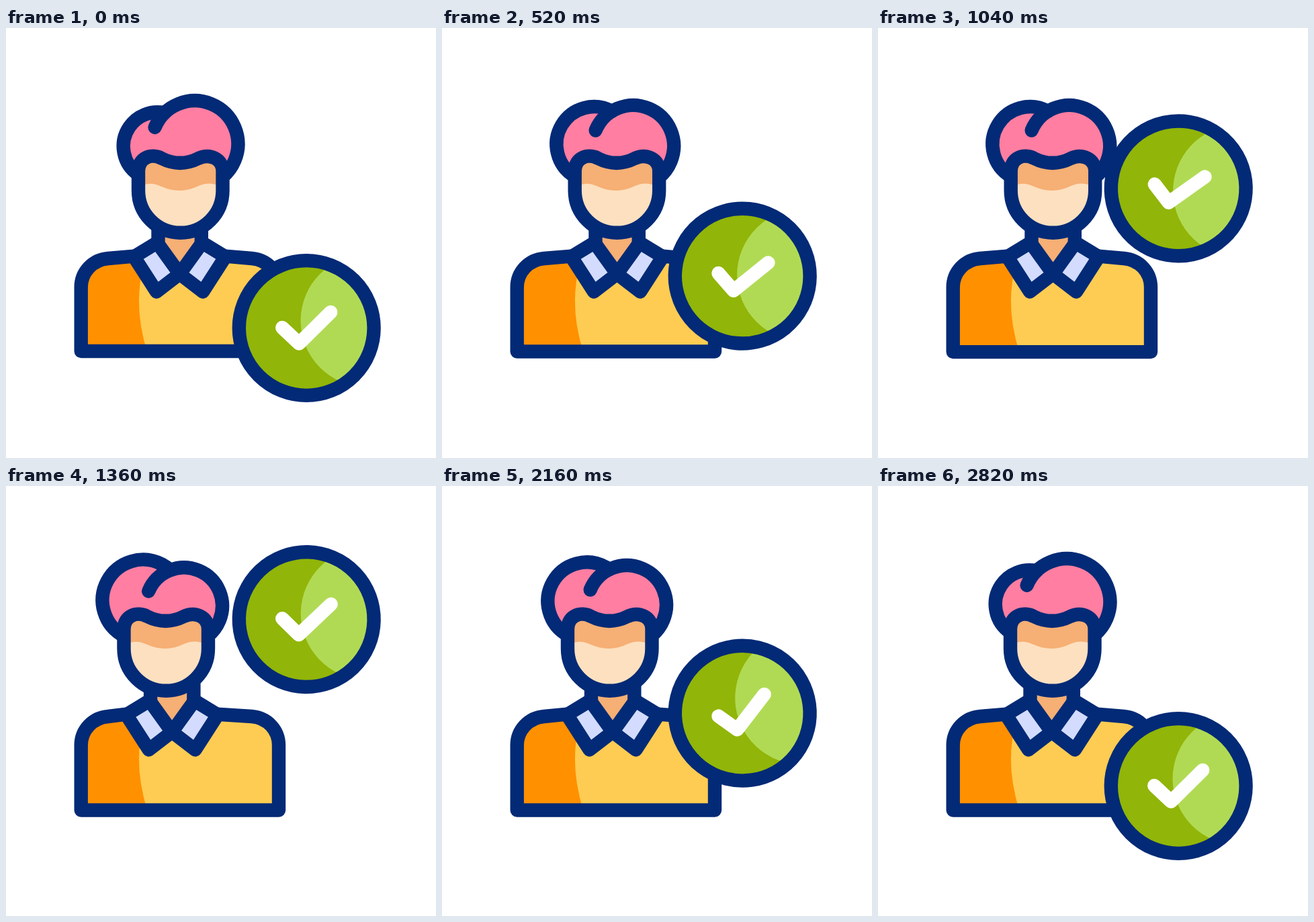
Recreate the animation shown at these times as an HTML page with a canvas. Size 640 by 640 pixels, loop 3.02 s.

```html
<!DOCTYPE html>
<html lang="en">
<head>
<meta charset="utf-8">
<title>Approved user</title>
<style>
  html, body { margin: 0; width: 100%; height: 100%; overflow: hidden; background: #fff; }
  canvas { display: block; width: 640px; height: 640px; }
</style>
</head>
<body>
<canvas id="stage"></canvas>
<script>
const LOOP = 3020, END = 2820, STEP = 20, LINE = 20.4;
const NAVY = '#032a76', PINK = '#ff7ea1', SKIN = '#fde0bf', SHADE = '#f6af74';
const ORANGE = '#ff9000', YELLOW = '#fecc52', CLOTH = '#d3dcfe';
const GREEN = '#91b508', LIME = '#b1da54', WHITE = '#fff';

const canvas = document.getElementById('stage');
const dpr = window.devicePixelRatio || 1;
canvas.width = canvas.height = 640 * dpr;
const ctx = canvas.getContext('2d');

// Eased value at time t between keyframes
function track(t, times, values) {
  const last = times.length - 1;
  if (t >= times[last]) return values[last];
  let i = 0;
  while (t >= times[i + 1]) i++;
  const u = (t - times[i]) / (times[i + 1] - times[i]);
  return values[i] + (values[i + 1] - values[i]) * u * u * (3 - 2 * u);
}

const SWAY = [0, 260, 780, 1300, 1820, 2340, 2800];
const sway = (t, left, right) => track(t, SWAY, [0, left, right, left, right, left, 0]);

function fill(path, color) {
  ctx.fillStyle = color;
  ctx.fill(path);
}

function stroke(path, color = NAVY) {
  ctx.strokeStyle = color;
  ctx.lineWidth = LINE;
  ctx.lineCap = ctx.lineJoin = 'round';
  ctx.stroke(path);
}

function disc(x, y, r) {
  const path = new Path2D();
  path.arc(x, y, r, 0, Math.PI * 2);
  return path;
}

function arc(c, from, to) {
  const path = new Path2D();
  path.arc(c.x, c.y, c.r, from, to);
  return path;
}

function group(x, y, draw) {
  ctx.save();
  ctx.translate(x, y);
  draw();
  ctx.restore();
}

function clipped(path, draw) {
  ctx.save();
  ctx.clip(path);
  draw();
  ctx.restore();
}

function drawBody(shift, base) {
  const body = new Path2D(`M111.7 ${base} V386 C111.7 363 129 345 152 343
    L${190.5 + shift} 339.7 L${258.5 + shift} 362 L${326.5 + shift} 339.7
    L366 343 C389 345 406 363 406 386 V${base} Z`);
  const side = new Path2D('M90 330 H212 L206 350 Q188 410 210 482 V500 H90 Z');
  const outline = new Path2D(`M${190.5 + shift} 339.7 L152 343
    C129 345 111.7 363 111.7 386 V${base} H406 V386
    C406 363 389 345 366 343 L${326.5 + shift} 339.7`);
  fill(body, YELLOW);
  clipped(body, () => fill(side, ORANGE));
  stroke(outline);
}

function drawCollar() {
  const neck = new Path2D('M226.5 290 H290.8 V320 L258.5 366 L226.5 320 Z');
  const flaps = new Path2D(`M225 319.5 L190.5 340.5 L224 392.5 L258.5 366 Z
    M292 319.5 L326.5 340.5 L293 392.5 L258.5 366 Z`);
  fill(neck, SHADE);
  stroke(new Path2D('M226.5 292 V319 M290.8 292 V319'));
  fill(flaps, CLOTH);
  stroke(flaps);
}

function drawHair(p) {
  const a = { x: 225, y: 176 - 5 * p, r: 50.8 + 8 * p };
  const b = { x: 280.5 + 4.5 * p, y: 172.5 + 5 * p, r: 64.3 - 6 * p };
  const dx = b.x - a.x, dy = b.y - a.y, d = Math.hypot(dx, dy);
  // The left lobe stops where it meets the right one
  const meet = Math.atan2(dy, dx) - Math.acos((a.r * a.r + d * d - b.r * b.r) / (2 * a.r * d));
  fill(disc(a.x, a.y, a.r), PINK);
  fill(disc(b.x, b.y, b.r), PINK);
  stroke(arc(a, Math.acos((196.5 - a.x) / a.r), meet + Math.PI * 2));
  stroke(arc(b, Math.PI * 1.125, Math.PI * 2 + Math.acos((322 - b.x) / b.r)));
}

function drawFace() {
  const face = new Path2D(`M196.5 213 C196.5 193 216 186 231 194
    C249 203 268 203 286 194 C303 186 322 195 322 213
    V242 A62.75 62.75 0 0 1 196.5 242 Z`);
  const shade = new Path2D(`M190 180 H330 V238 H322 C312 231 300 229 286 235
    C268 244 249 244 231 236 C217 229 205 231 196 238 H190 Z`);
  fill(face, SKIN);
  clipped(face, () => fill(shade, SHADE));
  stroke(face);
}

function drawBadge(angle) {
  const plate = disc(0, 0, 100.4);
  fill(plate, GREEN);
  ctx.rotate(angle * Math.PI / 180);
  clipped(plate, () => fill(disc(90, -10.8, 98.7), LIME));
  stroke(plate);
  stroke(new Path2D('M-36 -0.5 L-11 23 L36 -23.5'), WHITE);
}

function draw(t) {
  ctx.setTransform(dpr, 0, 0, dpr, 0, 0);
  ctx.fillStyle = WHITE;
  ctx.fillRect(0, 0, 640, 640);

  const shift = sway(t, -12.5, 16.5);
  const head = sway(t, -23.3, 24.7);
  drawBody(shift, 481 + 1.5 * Math.min(t / 1400, 1));
  group(shift, 0, drawCollar);
  group(head + 0.5, 0, () => {
    drawHair(sway(t, 1.25, 0));
    drawFace();
  });

  const y = track(t, [0, 1400, 2800], [446.5, 198, 446.5]);
  const turn = track(t, [0, 933, 1867, 2800], [0, 10, -10, 0]);
  group(447.2, y, () => drawBadge(turn));
}

const start = performance.now();
function tick() {
  const t = (performance.now() - start) % LOOP;
  draw(Math.min(Math.floor(t / STEP) * STEP, END));
  requestAnimationFrame(tick);
}
tick();
</script>
</body>
</html>
```
